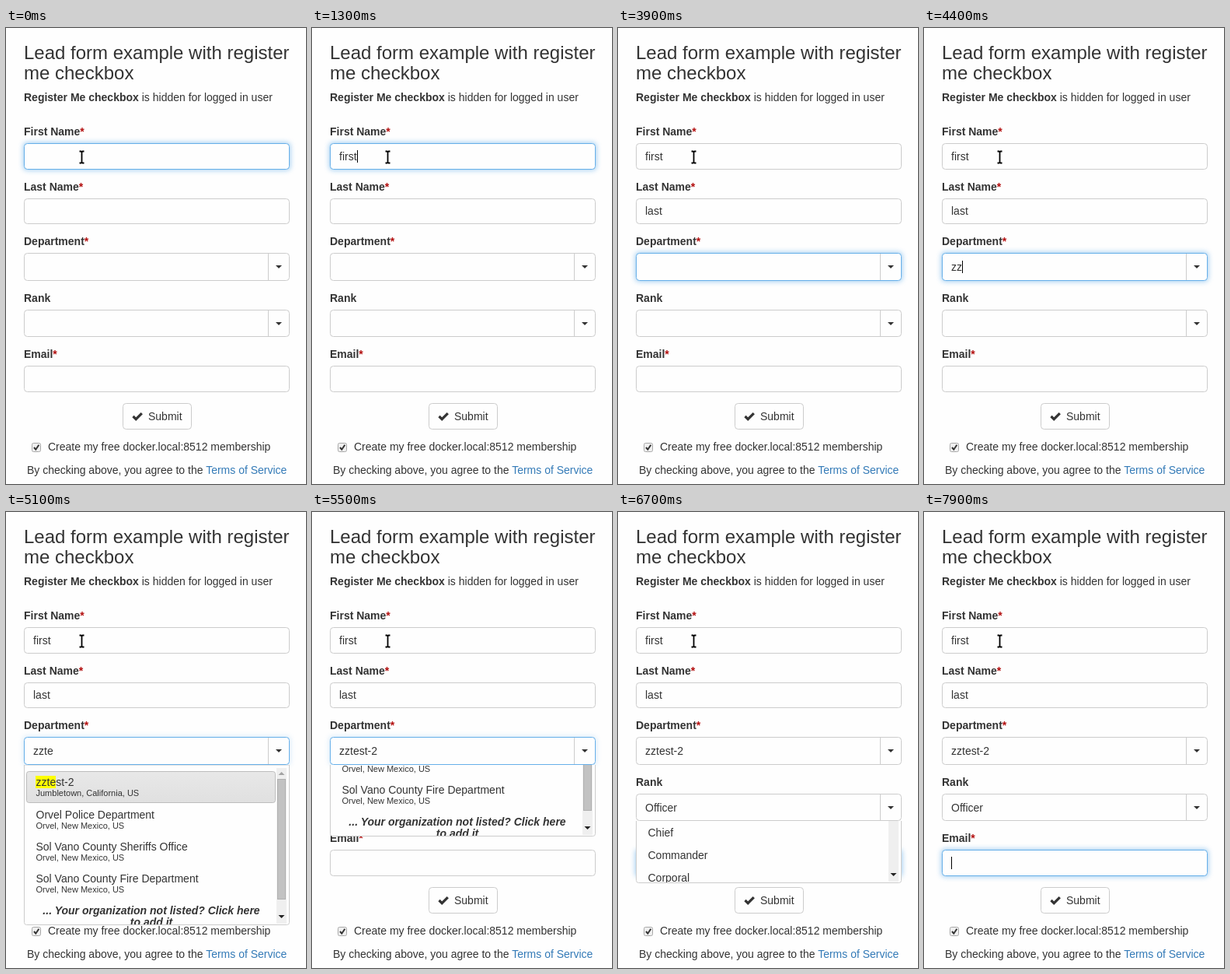
Write an HTML page that moves like this. It is 386 px wide and 586 px high and loops after 8 s.

```html
<!DOCTYPE html>
<html lang="en">
<head>
<meta charset="utf-8">
<title>Lead form</title>
<style>
  html, body { margin: 0; width: 100%; height: 100%; overflow: hidden; background: #fefefe; }
  svg { display: block; }
  text { font: 14px "Liberation Sans", Arial, sans-serif; fill: #333; }
  .title { font-size: 24px; }
  .bold { font-weight: bold; }
  .star { fill: #b30f0f; }
  .link { fill: #337ab7; }
  .small { font-size: 11px; }
  .hint { font-weight: bold; font-style: italic; text-anchor: middle; }
  .box { fill: #fefefe; stroke: #ccc; }
</style>
</head>
<body>
<svg id="stage" width="386" height="586" viewBox="0 0 386 586">
  <defs>
    <filter id="blur" filterUnits="userSpaceOnUse" x="0" y="0" width="386" height="586">
      <feGaussianBlur stdDeviation="3.2"/>
    </filter>
    <linearGradient id="shade" x2="0" y2="1">
      <stop stop-color="#e8e8e8"/><stop offset="1" stop-color="#e0e0e0"/>
    </linearGradient>
  </defs>
</svg>
<script>
const NS = "http://www.w3.org/2000/svg";
const stage = document.getElementById("stage");
const LOOP = 8000;

function add(parent, tag, attrs, content) {
  const el = document.createElementNS(NS, tag);
  for (const k in attrs) el.setAttribute(k, attrs[k]);
  if (content) el.textContent = content;
  parent.appendChild(el);
  return el;
}
const label = (parent, x, y, str, cls = "") => add(parent, "text", { x, y, class: cls }, str);
const rect = (parent, x, y, width, height, attrs) =>
  add(parent, "rect", { x, y, width, height, ...attrs });
const arrow = (parent, x, y, dir, fill) =>
  add(parent, "path", { d: `M${x - 4} ${y - 2 * dir}h8l-4 ${4 * dir}z`, fill });

// Latest value in a list of [time, value]
function at(list, t) {
  let value = "";
  for (const [start, v] of list) if (t >= start) value = v;
  return value;
}
function easeOut(p) {
  p = Math.min(1, Math.max(0, p));
  return 1 - (1 - p) ** 2;
}

// Static text
label(stage, 23, 40, "Lead form example with register", "title");
label(stage, 23, 66, "me checkbox", "title");
const intro = label(stage, 23, 94, "");
add(intro, "tspan", { class: "bold" }, "Register Me checkbox");
add(intro, "tspan", {}, " is hidden for logged in user");

// Form fields
const fields = {
  first: { name: "First Name", need: true, y: 148, h: 34, mid: 165,
    typed: [[500, "f"], [700, "fi"], [900, "fir"], [1100, "firs"], [1300, "first"]] },
  last: { name: "Last Name", need: true, y: 219, h: 33, mid: 235,
    typed: [[2000, "l"], [2100, "la"], [2300, "las"], [2500, "lasty"], [3100, "last"]] },
  dept: { name: "Department", need: true, y: 289, h: 36, mid: 307, combo: true,
    typed: [[4100, "z"], [4300, "zz"], [4500, "zzt"], [4700, "zzte"], [5500, "zztest-2"]] },
  rank: { name: "Rank", y: 362, h: 35, mid: 380, combo: true,
    typed: [[6500, "o"], [6600, "Officer"]] },
  email: { name: "Email", need: true, y: 434, h: 34, mid: 451, typed: [] }
};
const focus = [[0, "first"], [1500, "last"], [3300, ""], [3500, "dept"], [5900, "rank"], [6700, "email"]];
const carets = [[300, "first"], [1500, "last"], [3300, "dept"], [3900, ""], [4100, "dept"], [5100, ""],
  [5700, "rank"], [6600, ""], [6700, "email"], [7300, ""], [7900, "email"]];

for (const f of Object.values(fields)) {
  const head = label(stage, 23, f.y - 10, f.name, "bold");
  if (f.need) add(head, "tspan", { class: "star" }, "*");
  f.glow = rect(stage, 22, f.y - 1, 344, f.h + 2, { rx: 5, fill: "#66afe9", filter: "url(#blur)" });
  f.box = rect(stage, 23.5, f.y + .5, 341, f.h - 1, { rx: 4, class: "box" });
  if (f.combo) {
    rect(stage, 337, f.y + 1, 1, f.h - 2, { fill: "#ccc" });
    arrow(stage, 351, f.mid, 1, "#333");
  }
  f.text = label(stage, 35, f.mid + 5, "");
}
const caret = rect(stage, 35, 0, 1, 16, { fill: "#000" });

// Submit button and consent
rect(stage, 150.5, 482.5, 88, 33, { rx: 4, class: "box" });
add(stage, "path", { d: "M163.5 499l3.7 3.7 7.6-7.6", fill: "none", stroke: "#333", "stroke-width": 3.2 });
label(stage, 183, 504, "Submit");
rect(stage, 33.5, 533.5, 11, 11, { rx: 2, fill: "#f0f0f0", stroke: "#a8a8a8" });
add(stage, "path", { d: "M36 539l2.3 2.7 4-6", fill: "none", stroke: "#333", "stroke-width": 2 });
label(stage, 54, 543, "Create my free docker.local:8512 membership");
const terms = label(stage, 27, 573, "By checking above, you agree to the ");
add(terms, "tspan", { class: "link" }, "Terms of Service");

// Drop-down lists
function popup(y, h, open, openTime, close, thumbEnd) {
  const shadow = rect(stage, 24, y + 6, 340, h, { fill: "#000", opacity: .13, filter: "url(#blur)" });
  const view = add(stage, "svg", { x: 0, y, width: 386, height: h, overflow: "hidden" });
  const list = add(view, "g", {});
  add(list, "path", {
    d: `M23.5 0V${h - 3.5}q0 3 3 3H361.5q3 0 3-3V0z`, fill: "#fefefe", stroke: "#ccc"
  });
  rect(list, 348, 4, 13, h - 6, { fill: "#efefef" });
  rect(list, 349.5, 18.5, 10, thumbEnd - 18, { fill: "#c2c2c2", stroke: "#b0b0b0" });
  arrow(list, 354.5, 11, -1, "#a3a3a3");
  arrow(list, 354.5, h - 11, 1, "#222");
  return { shadow, view, list, h, open, openTime, close };
}

const depts = popup(325, 206, 4400, 400, 5400, 172);
rect(depts.list, 26.5, 8.5, 320, 40, { rx: 3, fill: "url(#shade)", stroke: "#bdbdbd" });
rect(depts.list, 38, 14, 26, 16, { fill: "#ff0" });
[
  ["zztest-2", "Jumbletown, California, US", 27],
  ["Orvel Police Department", "Orvel, New Mexico, US", 69],
  ["Sol Vano County Sheriffs Office", "Orvel, New Mexico, US", 110],
  ["Sol Vano County Fire Department", "Orvel, New Mexico, US", 151]
].forEach(([name, place, y]) => {
  label(depts.list, 38.5, y, name);
  label(depts.list, 38.5, y + 13, place, "small");
});
const hints = add(depts.list, "svg", { width: 386, height: 205, overflow: "hidden" });
label(hints, 187, 192, "... Your organization not listed? Click here", "hint");
label(hints, 187, 207, "to add it", "hint");

const ranks = popup(397, 176 + 3, 6400, 200, 6600, 70);
const rows = add(ranks.list, "svg", { width: 386, height: 178, overflow: "hidden" });
["Agent", "Assistant Chief", "Captain", "Chief", "Commander", "Corporal"]
  .forEach((name, i) => label(rows, 38.5, 32 + 29 * i, name));

// Mouse pointer
const beam = "M94.5 158.5h2l1 1l1-1h2M97.5 159.5v13M94.5 173.5h2l1-1l1 1h2";
add(stage, "path", { d: beam, fill: "none", stroke: "#fff", "stroke-width": 4 });
add(stage, "path", { d: beam, fill: "none", stroke: "#000", "stroke-width": 1.8 });

function slide(p, t) {
  const size = p.h * easeOut((t - p.open) / p.openTime) * (1 - easeOut((t - p.close) / 300));
  const shown = Math.round(size);
  p.view.setAttribute("height", shown);
  p.view.style.display = shown > 0 ? "" : "none";
  p.list.setAttribute("transform", `translate(0 ${shown - p.h})`);
  return shown > 0;
}

function draw(time) {
  const t = Math.floor((time % LOOP) / 100) * 100;
  const deptOpen = slide(depts, t), rankOpen = slide(ranks, t);
  depts.shadow.style.display = t >= 4800 && t < 5100 ? "" : "none";
  ranks.shadow.style.display = t === 6600 ? "" : "none";

  const active = at(focus, t);
  for (const [key, f] of Object.entries(fields)) {
    const on = key === active;
    const opened = (key === "dept" && deptOpen) || (key === "rank" && rankOpen);
    f.glow.setAttribute("opacity", on ? (opened ? .25 : .6) : 0);
    f.box.style.stroke = on ? "#66afe9" : "#ccc";
    f.text.textContent = at(f.typed, t);
  }

  const f = fields[at(carets, t)];
  caret.style.display = f ? "" : "none";
  if (f) {
    caret.setAttribute("x", Math.round(35 + f.text.getComputedTextLength()));
    caret.setAttribute("y", f.mid - 8);
  }
}

const start = performance.now();
function tick() {
  draw(performance.now() - start);
  requestAnimationFrame(tick);
}
tick();
</script>
</body>
</html>
```
